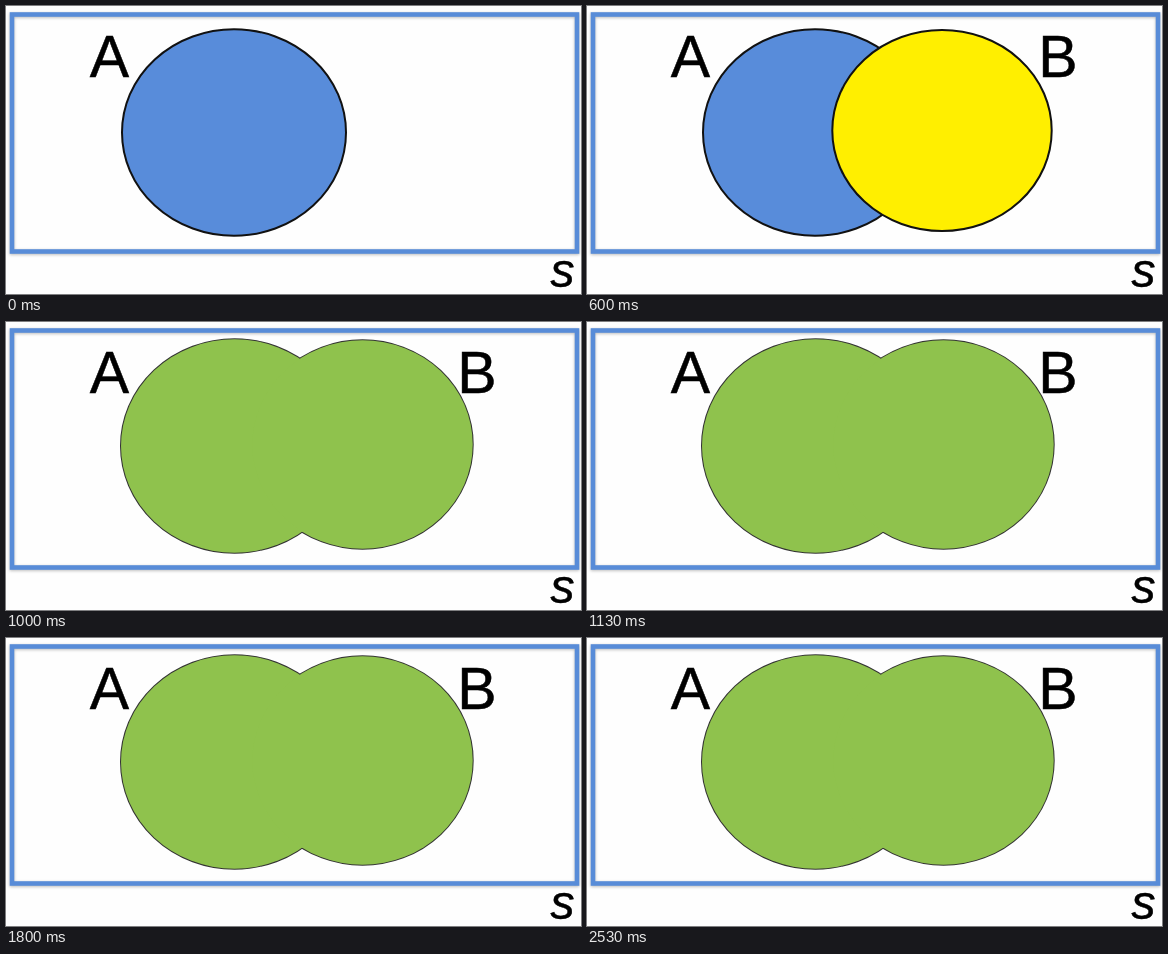
An HTML page for the animation above (2.8 s loop, 575x288 px).

```html
<!DOCTYPE html>
<html lang="en">
<head>
<meta charset="utf-8">
<title>Union of two sets</title>
<style>
html, body { margin: 0; width: 100%; height: 100%; overflow: hidden; background: #fefefe; }
svg { display: block; width: 575px; height: 288px; }
text { font: 59px "Liberation Sans", Arial, sans-serif; stroke: #000; stroke-width: .5; }
.space { font-size: 48px; font-style: italic; }
.frame { fill: none; stroke: #588cd8; stroke-width: 4.6; filter: blur(.5px) drop-shadow(0 1px 1.5px #0004); }
.set { stroke: #111; stroke-width: 2; }
.soft { filter: blur(.4px); }
</style>
</head>
<body>
<svg viewBox="0 0 575 288">
  <rect class="frame" x="6" y="8.5" width="565" height="237"/>
  <g class="soft">
    <ellipse id="setA" class="set" cx="228" cy="126.5" rx="112" ry="103.3" fill="#588cda"/>
    <ellipse id="setB" class="set" cx="355" cy="124.5" rx="109.7" ry="100.5" fill="#ffef00"/>
    <g id="union">
      <g id="lobes" fill="#8fc24d">
        <ellipse cx="228.5" cy="124" rx="113.5" ry="106.7"/>
        <ellipse cx="356.5" cy="122.5" rx="110.2" ry="104.2"/>
      </g>
    </g>
    <text x="83.8" y="71.3">A</text>
    <text id="labelB" x="451.3" y="71">B</text>
    <text class="space" x="544.5" y="281">s</text>
  </g>
</svg>
<script>
const LOOP = 2800, B_AT = 330, UNION_AT = 1000;
const get = id => document.getElementById(id);
const show = (id, on) => get(id).style.display = on ? "" : "none";

// A stroked copy under the filled lobes leaves only the outer outline visible.
const outline = get("lobes").cloneNode(true);
outline.removeAttribute("id");
outline.setAttribute("stroke", "#333");
outline.setAttribute("stroke-width", 2);
get("union").prepend(outline);

function draw(now) {
  const t = now % LOOP, joined = t >= UNION_AT;
  show("setA", !joined);
  show("setB", t >= B_AT && !joined);
  show("labelB", t >= B_AT);
  show("union", joined);
  requestAnimationFrame(() => draw(performance.now() - start));
}
const start = performance.now();
draw(0);
</script>
</body>
</html>
```
